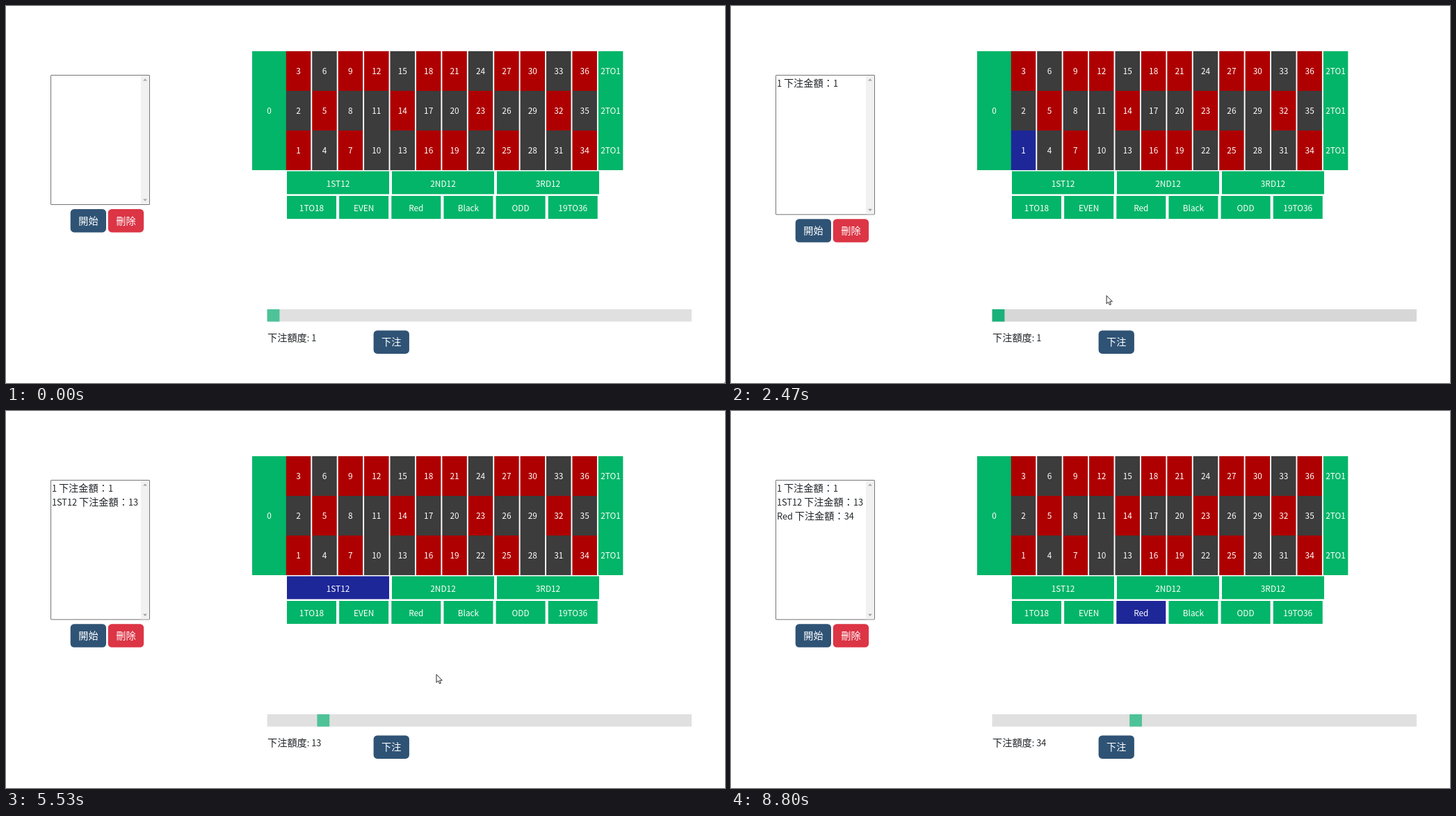
Recreate the animation shown at these times as an HTML page. Size 1034 by 542 pixels, loop 9.47 s.

```html
<!DOCTYPE html>
<html lang="zh-Hant">
<head>
<meta charset="utf-8">
<title>Roulette table</title>
<style>
html, body { margin: 0; width: 100%; height: 100%; overflow: hidden; background: #fff; }
svg { display: block; width: 1034px; height: 542px; }
text { font-family: "Noto Sans CJK TC", "Noto Sans CJK", "Noto Sans", sans-serif; white-space: pre; }
.cell { font-size: 11.85px; fill: #fff; text-anchor: middle; }
.btn { font-size: 14.2px; font-weight: 300; fill: #fff; text-anchor: middle; }
.line { font-size: 12.72px; fill: #212529; }
.line .han { font-size: 14.2px; font-weight: 300; }
</style>
</head>
<body>
<svg id="stage" viewBox="0 0 1034 542" xmlns="http://www.w3.org/2000/svg"></svg>
<script>
const NS = 'http://www.w3.org/2000/svg';
const stage = document.getElementById('stage');
const LOOP = 9470, STEP = 1000 / 15, FADE = 200;
const GREEN = [2, 181, 104], RED = [174, 0, 0], DARK = [60, 60, 60], BLUE = [30, 39, 152];

function add(tag, attrs, parent = stage) {
  const el = document.createElementNS(NS, tag);
  for (const k in attrs) el.setAttribute(k, attrs[k]);
  parent.appendChild(el);
  return el;
}
const rgb = c => `rgb(${c.map(Math.round).join(',')})`;
const clamp = v => Math.max(0, Math.min(1, v));
const mix = (a, b, k) => a.map((v, i) => v + (b[i] - v) * k);

function label(str, x, y, cls, parent) {
  const el = add('text', { x, y, class: cls }, parent);
  el.textContent = str;
  return el;
}

// Latin and Han runs have their own size within a line
function richLine(x, y, runs) {
  const el = add('text', { x, y, class: 'line' });
  return runs.map((str, i) => {
    const span = add('tspan', i % 2 ? { class: 'han' } : {}, el);
    span.textContent = str;
    return span;
  });
}

function cell(str, x, y, width, height, color, textY = y + height / 2) {
  const box = add('rect', { x, y, width, height, fill: rgb(color) });
  label(str, x + width / 2, textY + 4.3, 'cell');
  return box;
}

function button(str, x, y, fill, parent) {
  const g = add('g', {}, parent);
  add('rect', { x, y, width: 51.3, height: 33.4, rx: 5.3, fill }, g);
  label(str, x + 25.7, y + 21.6, 'btn', g);
  return g;
}

// Table
const reds = new Set([1, 3, 5, 7, 9, 12, 14, 16, 18, 19, 21, 23, 25, 27, 30, 32, 34, 36]);
const spots = {};
cell('0', 354, 65, 49, 171, GREEN);
for (let col = 0; col < 13; col++) {
  for (let row = 0; row < 3; row++) {
    const n = col * 3 + 3 - row, last = col === 12;
    const color = last ? GREEN : reds.has(n) ? RED : DARK;
    spots[n] = cell(last ? '2TO1' : n, 402.8 + 37.42 * col, 65 + 57 * row, 35.5, 57, color);
  }
}
['1ST12', '2ND12', '3RD12'].forEach((s, i) =>
  spots[s] = cell(s, 404 + 151 * i, 237.5, 147, 33, GREEN, 255.2));
['1TO18', 'EVEN', 'Red', 'Black', 'ODD', '19TO36'].forEach((s, i) =>
  spots[s] = cell(s, 404 + 75.15 * i, 273, 71, 33, GREEN, 291));

// Bet list
const list = add('rect', { x: 64.5, y: 99.5, width: 142, fill: '#fff', stroke: '#767676', rx: 0.5 });
const bar = add('rect', { x: 194, y: 100, width: 12, fill: '#f1f1f1' });
add('path', { d: 'M197 107.6l3-3.2 3 3.2z', fill: '#a3a3a3' });
const downArrow = add('path', { d: 'M197 -8.6l3 3.2 3 -3.2z', fill: '#a3a3a3' });
const controls = add('g', {});
button('開始', 92.7, 292, '#2f5375', controls);
button('刪除', 146.8, 292, '#dc3545', controls);
const bets = [
  { at: 2200, name: '1', sum: '1' },
  { at: 5000, name: '1ST12', sum: '13' },
  { at: 8400, name: 'Red', sum: '34' }
];
bets.forEach((b, i) => {
  b.el = richLine(66, 115.6 + 20 * i, [b.name + ' ', '下注金額：', b.sum])[0].parentNode;
});

// Slider
const slider = add('g', {});
add('rect', { x: 375.6, y: 436, width: 610.4, height: 17.7, fill: '#d3d3d3' }, slider);
const thumb = add('rect', { y: 436, width: 17.8, height: 17.7, fill: '#04aa6d' }, slider);
const amount = richLine(376, 482, ['', '下注額度', ': 1'])[2];
button('下注', 528.6, 466.5, '#2f5375');

// Pointers
const pointers = {
  arrow: add('path', { d: 'M.5.5V12.2L3.2 9.7 5 13.8 6.9 13 5.1 9H8.8Z', fill: '#fff', stroke: '#111', 'stroke-width': 0.9 }),
  beam: add('path', { d: 'M-2.5-6Q0-6 0-4.8Q0-6 2.5-6M0-5V5M-2.5 6Q0 6 0 4.8Q0 6 2.5 6', fill: 'none', stroke: '#d8cfa4', 'stroke-width': 1 }),
  hand: add('path', {
    d: 'M-1.3 9V1.2Q-1.3 0 0 0T1.3 1.2V6Q3.2 5 3.8 6.6Q5.6 5.9 6 7.3Q8 6.9 8 9V12Q8 13.6 6.9 15V16.7H.3V15.2L-3.8 10.2Q-4.6 8.6-3.4 8.1Q-2.3 8-1.3 9.4M1.3 6V9M3.8 6.6V9.4M6 7.3V9.8',
    fill: '#fff', stroke: '#111', 'stroke-width': 0.9, 'stroke-linejoin': 'round'
  })
};

// time, x, y, pointer shape until the next key
const path = [
  [0, 1033, 541, 'arrow'], [200, 1033, 541, 'arrow'], [640, 690, 330, 'arrow'],
  [1070, 418, 182, 'arrow'], [1270, 418, 182, 'arrow'], [1600, 413.5, 344, 'arrow'],
  [1780, 455, 440, 'hand'], [1860, 495, 455, 'arrow'], [1930, 535, 470, 'hand'],
  [2000, 566, 478, 'hand'], [2200, 566, 478, 'hand'], [2280, 562, 464, 'arrow'],
  [2340, 555, 453, 'hand'], [2420, 545, 435, 'arrow'], [2870, 494, 255, 'beam'],
  [2930, 494, 248, 'beam'], [3200, 494, 248, 'beam'], [3330, 484, 272, 'arrow'],
  [3920, 390, 437, 'hand'], [4000, 385, 444, 'hand'], [4070, 385, 444, 'hand'],
  [4400, 457, 444, 'hand'], [4560, 457, 444, 'arrow'], [4600, 487, 458, 'arrow'],
  [4700, 532, 472, 'hand'], [4800, 566, 487, 'hand'], [5000, 566, 487, 'hand'],
  [5080, 577, 464, 'arrow'], [5130, 583, 453, 'hand'], [5200, 592, 435, 'arrow'],
  [5730, 634, 345, 'arrow'], [5870, 634, 345, 'arrow'], [6080, 584, 298, 'arrow'],
  [6150, 580, 300, 'arrow'], [6266, 545, 358, 'arrow'], [6720, 466, 438, 'hand'],
  [6800, 457, 446, 'hand'], [6870, 457, 446, 'hand'], [7133, 492.5, 439, 'hand'],
  [7400, 582, 444, 'hand'], [7930, 582, 444, 'hand'], [7990, 575, 456, 'arrow'],
  [8060, 568, 468, 'hand'], [8130, 562, 480, 'hand'], [8400, 562, 480, 'hand'],
  [8600, 554, 501, 'arrow'], [8780, 545, 515, 'arrow']
];
const drag = [[0, 1], [4070, 1], [4400, 13], [6870, 13], [7133, 17], [7400, 34], [LOOP, 34]];
const hovers = [[1770, 1860], [2330, 2420], [3860, 4600], [5120, 5200], [6660, 7950]];
const picks = [['1', RED, 1270, 3035], ['1ST12', GREEN, 3035, 6127], ['Red', GREEN, 6127, 1e5]];

function sample(keys, t) {
  let i = 0;
  while (i < keys.length - 2 && t >= keys[i + 1][0]) i++;
  const a = keys[i], b = keys[i + 1], k = clamp((t - a[0]) / (b[0] - a[0]));
  return a.map((v, j) => typeof v === 'number' ? v + (b[j] - v) * k : v);
}
const pulse = (t, on, off) => Math.min(clamp((t - on) / FADE), clamp(1 - (t - off) / FADE));

function draw(ms) {
  // the screen advances fifteen times a second
  const t = Math.floor((ms + 5) / STEP) * STEP + 1;

  for (const [id, base, on, off] of picks)
    spots[id].setAttribute('fill', rgb(mix(base, BLUE, pulse(t, on, off))));

  const grow = t >= bets[0].at ? 14.3 : 0;
  list.setAttribute('height', 186 + grow);
  bar.setAttribute('height', 185 + grow);
  downArrow.setAttribute('transform', `translate(0 ${286 + grow})`);
  controls.setAttribute('transform', `translate(0 ${grow})`);
  for (const b of bets) b.el.setAttribute('visibility', t >= b.at ? 'visible' : 'hidden');

  const value = Math.round(sample(drag, t)[1]);
  thumb.setAttribute('x', 375.6 + 5.987 * (value - 1));
  amount.textContent = ': ' + value;
  slider.setAttribute('opacity', 0.7 + 0.3 * Math.max(...hovers.map(h => pulse(t, h[0], h[1]))));

  const [, x, y, shape] = sample(path, t);
  for (const name in pointers) {
    const shown = name === shape && t < 8780;
    pointers[name].setAttribute('visibility', shown ? 'visible' : 'hidden');
    pointers[name].setAttribute('transform', `translate(${x.toFixed(1)} ${y.toFixed(1)})`);
  }
}

const start = performance.now();
function tick() {
  draw((performance.now() - start) % LOOP);
  requestAnimationFrame(tick);
}
tick();
</script>
</body>
</html>
```
